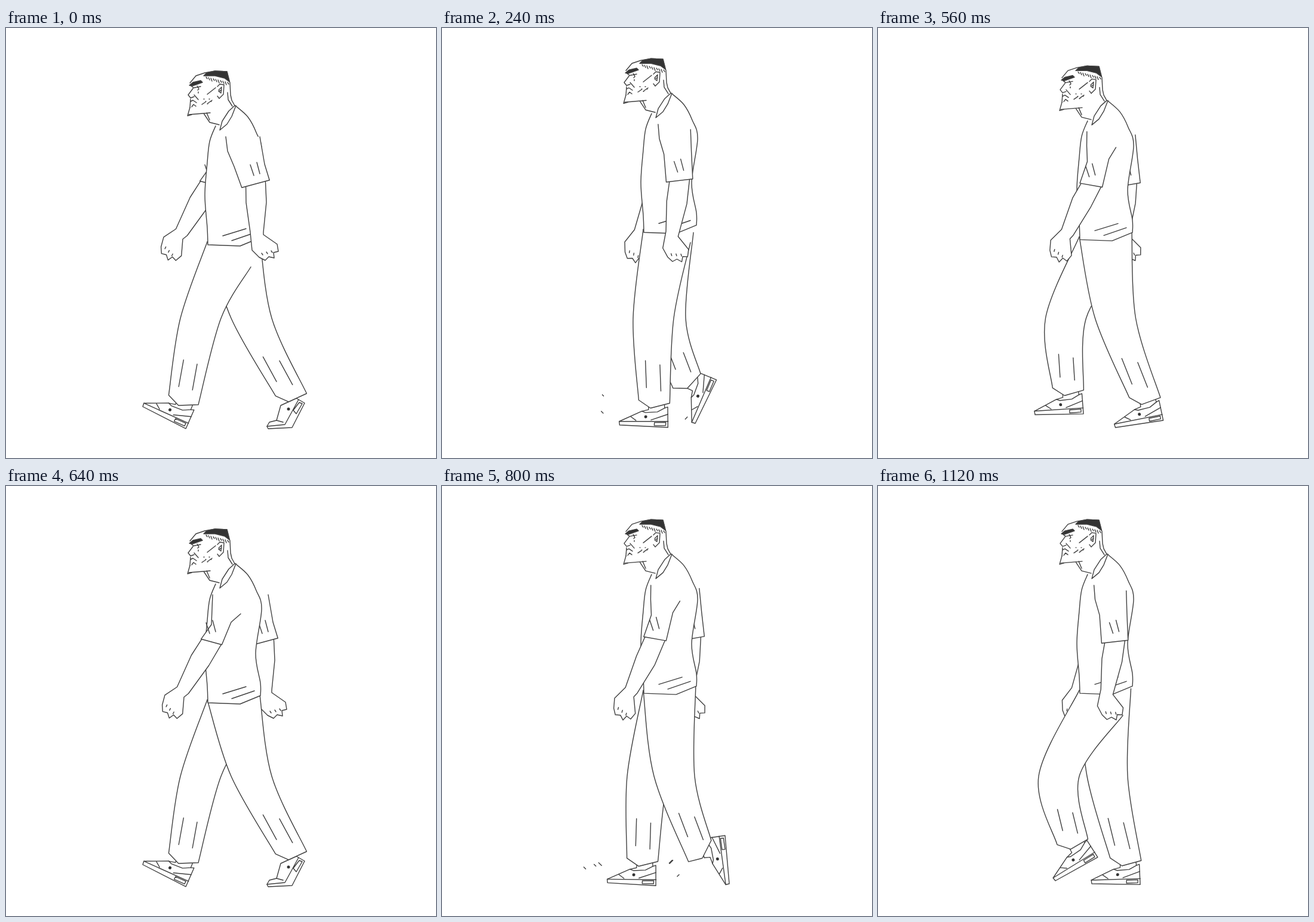
These frames come from a looping animation (720 by 720 pixels, 1200 ms). An HTML page:

```html
<!DOCTYPE html>
<html lang="en">
<head>
<meta charset="utf-8">
<title>Walk cycle</title>
<style>
  html, body { margin: 0; width: 100%; height: 100%; overflow: hidden; background: #fff; }
  svg { display: block; width: 100vw; height: 100vh; }
  path { fill: #fff; stroke: #404040; stroke-width: 1.4; stroke-linejoin: round; stroke-linecap: round; }
  .line path, path.line { fill: none; }
  .ink path, .ink { fill: #333; }
</style>
</head>
<body>
<svg viewBox="0 0 720 720">
  <defs>
    <g id="shoe">
      <path d="M0 0L-1 -6L36 -25L47 -28V-38L73 -42L74 -32L79 -34L81 0Z"/>
      <path class="line" d="M-1 -6L81 -10M18 -15L27 -9M52 -11L80 -22M36 -25L42 -23L62 -25L74 -32M58 -7L77 -8V-3L58 -2Z"/>
      <circle class="ink" cx="43" cy="-16" r="2.5"/>
    </g>
    <g id="bentShoe">
      <path d="M0 -1L4 -8L16 -11L23 -36L49 -48L63 -40L42 1L2 3Z"/>
      <path class="line" d="M0 -1L30 -4L53 -46M16 -11L27 -8M44 -28L54 -41L59 -39L49 -22Z"/>
      <circle class="ink" cx="36" cy="-30" r="2.5"/>
    </g>
  </defs>
  <path id="farForearm"/>
  <path id="farSleeve"/>
  <use id="farShoe"/>
  <path id="farLeg"/>
  <use id="nearShoe"/>
  <path id="nearLeg"/>
  <g id="body">
    <path id="torso"/>
    <path class="line" d="M363 348L402 336M378 356L416 343"/>
    <g class="line">
      <path d="M308 92L318 80L333 75L350 72L370 73L375 92L376 112L378 121L383 130M371 108L372 120L379 131"/>
      <path d="M310 97L314 100L305 112L309 117L315 115M315 112L322 120M309 119L308 133M309 123L313 121L319 125M311 132L314 128L318 131"/>
      <path d="M315 100L326 98M320 97L323 102L321 104M322 107V109M337 111L351 100M328 128L334 124M338 126L345 121"/>
      <path d="M354 98L358 94L365 95L364 111L357 118L354 114M356 104L361 99L360 109L356 106L361 104"/>
      <path id="stubble"/>
      <path d="M336 142L341 154M331 143L341 158L357 162M306 145L342 142"/>
      <path d="M308 133L304 147L311 145"/>
      <path d="M383 130L373 139L362 156L358 171L370 161L378 148L385 130"/>
      <g class="ink">
        <path d="M331 80L336 75L350 72L370 73L374 90L366 84L350 80Z"/>
        <path d="M307 96L313 91L326 88L329 91L312 97Z"/>
      </g>
    </g>
  </g>
  <path id="nearForearm"/>
  <path id="nearSleeve"/>
  <path id="dust" class="line"/>
</svg>
<script>
const STEP = 80, FRAMES = 15, CYCLE = 16;
const $ = id => document.getElementById(id);
const set = (id, d) => $(id).setAttribute('d', d);

// One stride of a leg: phase, toe x, toe y, shoe turn, knee x.
const stride = [
  [0, 229, 634, 27, 326],
  [1, 257, 664, 4, 334],
  [6, 358, 666, 1, 384],
  [8, 437, 672, -18, 411],
  [10, 481, 666, -95, 389],
  [11, 424, 662, -64, 374],
  [12, 349, 661, -31, 327],
  [14, 297, 661, -29, 303]
];
// Arm swing of the near arm: 1 is fully back, -1 fully forward.
const swing = [[0, 1], [3, .45], [5, .03], [8, -1], [10, -.66], [12, 0], [14, .42]];

function sample(keys, time) {
  const i = keys.findLastIndex(key => key[0] <= time);
  const a = keys[i], b = keys[i + 1] || [CYCLE, ...keys[0].slice(1)];
  const k = (time - a[0]) / (b[0] - a[0]);
  return a.slice(1).map((v, n) => v + (b[n + 1] - v) * k);
}

const add = ([x, y], [dx, dy], k = 1) => [x + dx * k, y + dy * k];
const mix = ([ax, ay], [bx, by], k) => [ax + (bx - ax) * k, ay + (by - ay) * k];
const rotate = ([x, y], degrees) => {
  const a = degrees * Math.PI / 180, c = Math.cos(a), s = Math.sin(a);
  return [x * c - y * s, x * s + y * c];
};
// Unit vector across the limb from a to b, pointing right for a hanging limb.
const across = (a, b) => {
  const dx = b[0] - a[0], dy = b[1] - a[1], length = Math.hypot(dx, dy);
  return [dy / length, -dx / length];
};

const show = p => p.map(v => v.toFixed(1)).join(' ');
const line = points => points.map(show).join('L');
const segment = (a, b) => `M${show(a)}L${show(b)}`;

// Smooth curve through the points.
function curve(points) {
  let d = show(points[0]);
  for (let i = 1; i < points.length; i++) {
    const a = points[i - 1], b = points[i];
    const before = points[i - 2] || a, after = points[i + 1] || b;
    const out = add(a, mix(before, b, .5).map((v, n) => (b[n] - before[n]) / 6));
    const into = add(b, [after[0] - a[0], after[1] - a[1]], -1 / 6);
    d += `C${show(out)} ${show(into)} ${show(b)}`;
  }
  return d;
}

function seeded(seed) {
  return () => {
    const v = Math.sin(seed++ * 12.9898) * 43758.5453;
    return v - Math.floor(v);
  };
}

function drawLeg(side, phase, bob) {
  const [x, y, turn, kneeX] = sample(stride, phase);
  const ankle = add([x, y], rotate([60, -40], turn));
  const cuff = (dx, dy) => add(ankle, rotate([dx, dy], turn / 2));
  const knee = [kneeX, 486];
  const forward = Math.min(1, Math.max(0, (390 - kneeX) / 60));
  const front = [[337, 358 + bob], add(knee, [-34, 0]), cuff(-30, -4)];
  const back = [cuff(22, 0), add(knee, [34, 0]), [425 - 15 * forward, 350 + bob + 50 * forward]];
  const crease = (from, to, offset) =>
    segment(add(mix(knee, ankle, from), [offset, 0]), add(mix(knee, ankle, to), [offset, 0]));

  set(side + 'Leg', 'M' + curve(front) + 'L' + show(cuff(-10, 9)) + 'L' + curve(back)
    + crease(.5, .82, -16) + crease(.55, .86, 8));

  const bent = phase === 8, shoe = $(side + 'Shoe');
  shoe.setAttribute('href', bent ? '#bentShoe' : '#shoe');
  shoe.setAttribute('transform', bent ? `translate(${x} ${y - 4})` : `translate(${x} ${y}) rotate(${turn})`);
}

const fist = [[-8, 30], [4, 42], [14, 47], [20, 41], [29, 43], [28, 34], [36, 32], [34, 20], [11, 4]];

function drawArm(side, s, bob, shift) {
  const at = (x, y) => [x + shift, y];
  const cuff = at(381 + 37 * s, 280 - 19 * s * s + bob);
  const elbow = at(372 + 47 * s, 292), wrist = at(358 + 62 * s, 342);
  const hem = rotate([1, 0], -15 * s), side1 = across(elbow, wrist);
  const inHand = p => add(wrist, rotate(p, 30 * (1 - s)));
  const knuckles = [8, 16, 24].map(k => segment(inHand([k, 37 - k / 4]), inHand([k + 2, 40 - k / 4])));

  set(side + 'Forearm', 'M' + line([
    add(cuff, hem, -17), add(elbow, side1, -17), add(wrist, side1, -11),
    ...fist.map(inHand),
    add(wrist, side1, 11), add(elbow, side1, 17), add(cuff, hem, 17)
  ]) + knuckles.join(''));

  const width = 21 + 3 * s;
  set(side + 'Sleeve', 'M' + line([
    at(357 + 11 * s, 182 + bob), at(358 + 13 * s, 206 + bob), at(363 + 19 * s, 232 + bob),
    add(cuff, hem, -width), add(cuff, hem, width),
    at(405 + 28 * s, 228 + bob), at(409 + 16 * s, 198 - 16 * s + bob)
  ]) + segment(add(cuff, [-9, -32]), add(cuff, [-3, -14])) + segment(add(cuff, [2, -36]), add(cuff, [7, -17])));
}

// Short dashes thrown up on both sides of a shoe that has just landed.
function puff(phase) {
  if (phase < 2 || phase > 3) return '';
  const [x, y] = sample(stride, phase), random = seeded(phase);
  let d = '';
  for (let i = 0; i < 12 - 3 * phase; i++) {
    const dir = i % 2 ? 1 : -1, reach = 8 + 35 * random();
    const from = [x + 40 + dir * (40 + reach), y - 2 - 48 * random()];
    d += segment(from, add(from, [dir * 3, -3], 3 - phase / 2 - random()));
  }
  return d;
}

function draw(frame) {
  const nearPhase = frame, farPhase = (frame + 8) % CYCLE;
  const bob = -22.5 * Math.sin(Math.PI * (frame % 8) / 8);
  const [s] = sample(swing, frame);
  drawArm('far', -s, bob, 6 - 8 * s);
  drawLeg('far', farPhase, bob);
  drawLeg('near', nearPhase, bob);
  drawArm('near', s, bob, 0);
  $('body').setAttribute('transform', `translate(0 ${bob})`);
  set('dust', puff(nearPhase) + puff(farPhase));
}

const torsoBack = [[384, 130], [405, 149], [419, 175], [428, 206], [418, 280], [426, 330], [426, 351]];
const torsoFront = [[338, 363], [337, 335], [333, 280], [337, 225], [341, 190], [351, 164]];
set('torso', 'M' + curve(torsoBack) + 'L392 365L' + curve(torsoFront));

let hairs = '';
for (let i = 0; i < 10; i++) hairs += `M${335 + 4 * i} ${82 + i}l2 ${3 + i % 3}`;
for (let i = 0; i < 5; i++) hairs += `M${331 + 3 * i} ${119 + 4 * (i % 3)}h1`;
set('stubble', hairs);

const start = performance.now();
function tick() {
  draw(Math.floor((performance.now() - start) / STEP) % FRAMES);
  requestAnimationFrame(tick);
}
tick();
</script>
</body>
</html>
```
